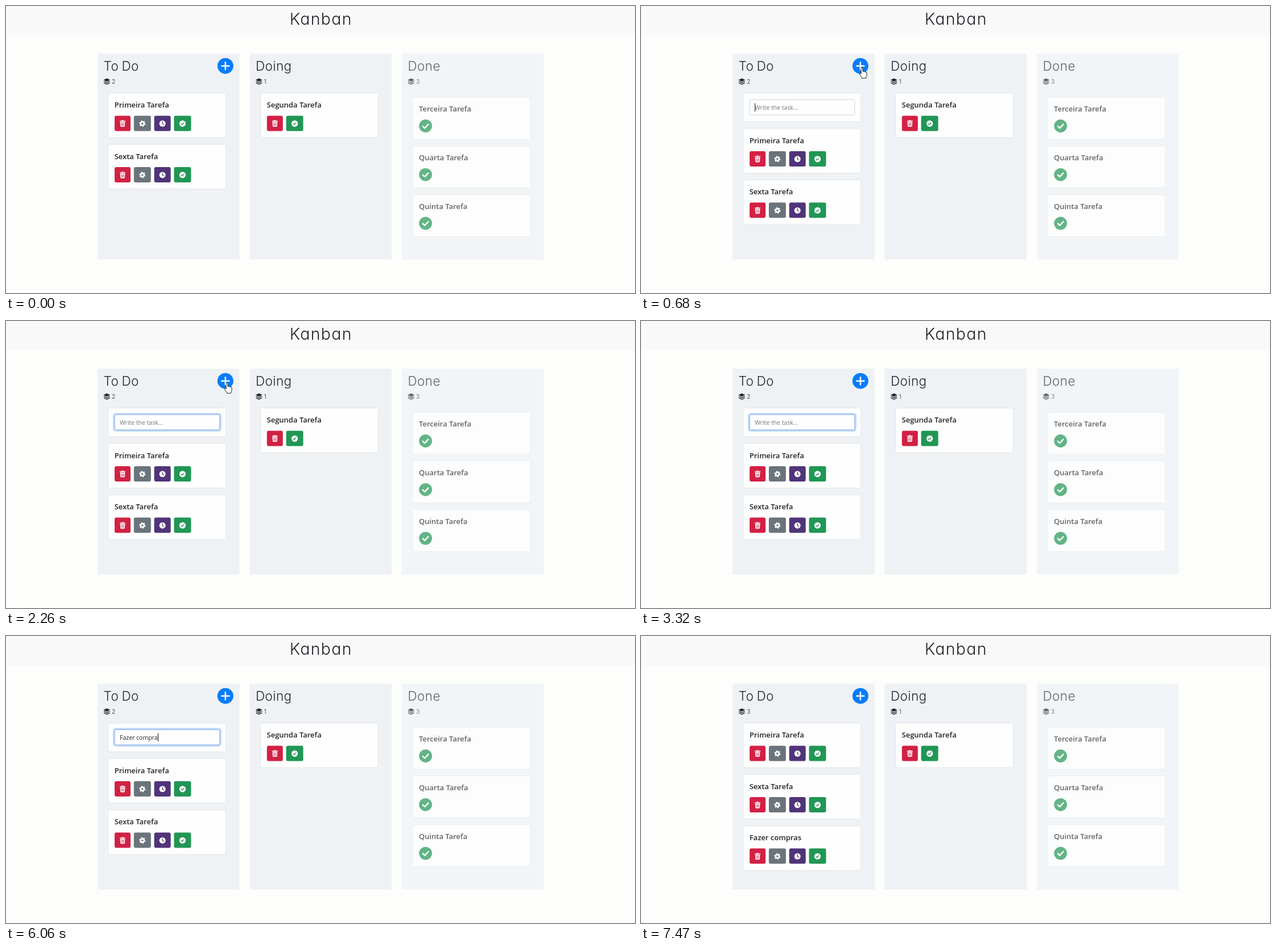
Recreate the animation shown at these times as an HTML page. Size 1106 by 506 pixels, loop 8000 ms.

```html
<!DOCTYPE html>
<html lang="pt">
<head>
<meta charset="utf-8">
<title>Kanban</title>
<style>
  html, body { margin: 0; width: 100%; height: 100%; overflow: hidden; background: #fdfdfc; }
  svg { display: block; width: 1106px; height: 506px; }
  text { fill: #212529; white-space: pre; }
  .title { font-family: Inter, sans-serif; font-weight: 350; font-feature-settings: "cv11"; }
  .task { font: 560 13px "Open Sans", "Noto Sans", sans-serif; }
  .field { font: 10.5px "Open Sans", "Noto Sans", sans-serif; }
  .card { fill: #fefefe; stroke: #e3e6e9; }
  .line { fill: none; stroke-linecap: round; stroke-linejoin: round; }
</style>
</head>
<body>
<svg id="stage" viewBox="0 0 1106 506"></svg>
<script>
const LOOP = 8000, OPEN = 680, SUBMIT = 7470, BLINK = 525;
const TASK = 'Fazer compras';
const KEYS = [3890, 4070, 4270, 4370, 4520, 4610, 5090, 5190, 5480, 5710, 5910, 6060, 6800];
// Pointer stops: time, x, y
const POINTER = [[140, 911, 319], [210, 545, 174], [350, 388.5, 111], [420, 388.5, 110], [490, 388.5, 108.5]];
const POINTER_HIDE = 2630;

const at = (x, y, body) => `<g transform="translate(${x} ${y})">${body}</g>`;
const tick = (size, color, width) =>
  `<path class="line" d="M${-size} ${size * .1}l${size * .7} ${size * .7} ${size * 1.3} ${-size * 1.4}" stroke="${color}" stroke-width="${width}"/>`;

const BUTTONS = {
  trash: { w: 28, color: '#d22144', icon: c => `
    <path fill="#fff" d="M-5-5h3l.8-1h2.4l.8 1h3v1.4h-10zM-4.4-2.8h8.8l-.6 7.6q-.1 1-1 1h-5.6q-.9 0-1-1z"/>
    <path d="M-2-1.2v5.4M0-1.2v5.4M2-1.2v5.4" stroke="${c}" stroke-width=".9"/>` },
  gear: { w: 30, color: '#6b747c', icon: () => `
    <circle r="3" fill="none" stroke="#fff" stroke-width="2.6"/>
    <circle r="4.6" fill="none" stroke="#fff" stroke-width="2" pathLength="12" stroke-dasharray="1"/>` },
  clock: { w: 29, color: '#503479', icon: c => `
    <circle r="5.5" fill="#fff"/>
    <path class="line" d="M0-3.3V0l2 1.6" stroke="${c}" stroke-width="1.3"/>` },
  check: { w: 30, color: '#219655', icon: c => `<circle r="5.6" fill="#fff"/>${tick(2.3, c, 1.4)}` }
};

function buttonRow(names) {
  let x = 11.3;
  return names.map(name => {
    const { w, color, icon } = BUTTONS[name];
    const markup = `<rect x="${x}" y="39.9" width="${w}" height="27" rx="3" fill="${color}"/>` + at(x + w / 2, 53.8, icon(color));
    x += w + 5.8;
    return markup;
  }).join('');
}

const card = (x, y, text, buttons) => at(x, y,
  `<rect class="card" width="207" height="78.5" rx="3"/><text class="task" x="11" y="25.5">${text}</text>${buttonRow(buttons)}`);

const doneCard = (y, text) => at(715, y,
  `<rect class="card" width="207" height="74" rx="3"/><text class="task" x="11" y="25">${text}</text>` +
  at(22.7, 50.5, `<circle r="11.4" fill="#219655"/>${tick(4.8, '#fff', 2.4)}`));

const column = (x, title, count, id) => `
  <rect x="${x}" y="84" width="249.5" height="363" fill="#eef2f5"/>
  <text class="title" x="${x + 10.5}" y="113.5" font-size="22.5" letter-spacing=".4" word-spacing="-1.5">${title}</text>` +
  at(x + 16.3, 133.2, `<path fill="#212529" d="M0-5.6L6-2.8 0 0-6-2.8z
    M-6 0l1.6-.8L0 1.3 4.4-.8 6 0 0 2.8zM-6 2.8L-4.4 2 0 4.1 4.4 2 6 2.8 0 5.6z"/>`) +
  `<text class="title" id="${id}" x="${x + 25}" y="137.3" font-size="10.5">${count}</text>`;

const all = ['trash', 'gear', 'clock', 'check'];
const todoY = i => 153.5 + i * 90.6;

document.getElementById('stage').innerHTML = `
  <rect width="1106" height="506" fill="#fdfdfc"/>
  <rect width="1106" height="52" fill="#f9f9fa"/>
  <text class="title" x="553.8" y="32.5" font-size="28.5" letter-spacing="1.3" text-anchor="middle">Kanban</text>
  ${column(161, 'To Do', 2, 'todoCount')}
  <circle cx="385.8" cy="105.7" r="14" fill="#0a7cfa"/>
  <path class="line" d="M379.3 105.7h13M385.8 99.2v13" stroke="#fff" stroke-width="2.5"/>
  <g id="tasks">
    ${card(179.7, todoY(0), 'Primeira Tarefa', all)}
    ${card(179.7, todoY(1), 'Sexta Tarefa', all)}
  </g>
  <g id="added">${card(179.7, todoY(2), TASK, all)}</g>
  <g id="entry">
    <rect class="card" x="179.7" y="153.5" width="207" height="50.5" rx="3"/>
    <rect id="ring" x="189.4" y="163.4" width="188" height="30.2" rx="4" fill="none" stroke="#0d6efd" stroke-opacity=".25" stroke-width="3"/>
    <rect x="191" y="165" width="184.8" height="27" rx="2.6" fill="#fefefe" stroke="#ced4da"/>
    <rect id="border" x="191" y="165" width="184.8" height="27" rx="2.6" fill="none" stroke="#86b0f6"/>
    <text class="field" id="hint" x="200" y="183" style="fill:#6c757d">Write the task...</text>
    <text class="field" id="typed" x="200" y="183"></text>
    <rect id="caret" y="171.5" width="1" height="14.5" fill="#111"/>
  </g>
  ${column(428.5, 'Doing', 1, 'doingCount')}
  ${card(447.5, 153.5, 'Segunda Tarefa', ['trash', 'check'])}
  <g opacity=".7">
    ${column(696, 'Done', 3, 'doneCount')}
    ${['Terceira', 'Quarta', 'Quinta'].map((n, i) => doneCard(161 + i * 85.8, n + ' Tarefa')).join('')}
  </g>
  <g id="pointer" fill="#fff" stroke="#222" stroke-linejoin="round">
    <path id="arrow" d="M0 0v15l3.5-3.2 2.3 5.4 2.4-1-2.3-5.2h4.8z"/>
    <path id="hand" d="M-1.5 1.8a1.5 1.5 0 0 1 3 0V7q1.4-1 2.6.3 1.4-.7 2.4.6 1.9-.5 2 1.6V13q0 3-1.5 4.5v1.3h-7.3V17.3l-4-5.6q-.6-2 1.3-1.7l1.5 1.4z"/>
  </g>`;

const el = id => document.getElementById(id);
const show = (id, on) => { el(id).style.display = on ? '' : 'none'; };
const setText = (id, value) => { if (el(id).textContent !== value) el(id).textContent = value; };

function render(t) {
  const editing = t >= OPEN && t < SUBMIT, submitted = t >= SUBMIT;
  el('tasks').setAttribute('transform', `translate(0 ${editing ? 62.5 : 0})`);
  show('entry', editing);
  show('added', submitted);
  setText('todoCount', submitted ? '3' : '2');

  if (editing) {
    const pressed = KEYS.filter(k => k <= t);
    const length = pressed.length;
    const focus = Math.min(1, Math.max(0, (t - 740) / 250));
    el('ring').style.opacity = el('border').style.opacity = focus;
    show('hint', !length);
    setText('typed', TASK.slice(0, length));
    const lastAction = length ? pressed[length - 1] : OPEN;
    show('caret', Math.floor((t - lastAction) / BLINK) % 2 === 0);
    el('caret').setAttribute('x', Math.round(200 + (length ? el('typed').getComputedTextLength() : 0)));
  }

  const stop = POINTER.filter(p => p[0] <= t).pop();
  show('pointer', stop && t < POINTER_HIDE);
  if (stop) {
    const [time, x, y] = stop;
    el('pointer').setAttribute('transform', `translate(${x} ${y})`);
    show('hand', time >= 350);
    show('arrow', time < 350);
  }
}

const start = performance.now();
function frame() {
  render((performance.now() - start) % LOOP);
  requestAnimationFrame(frame);
}
frame();
</script>
</body>
</html>
```
